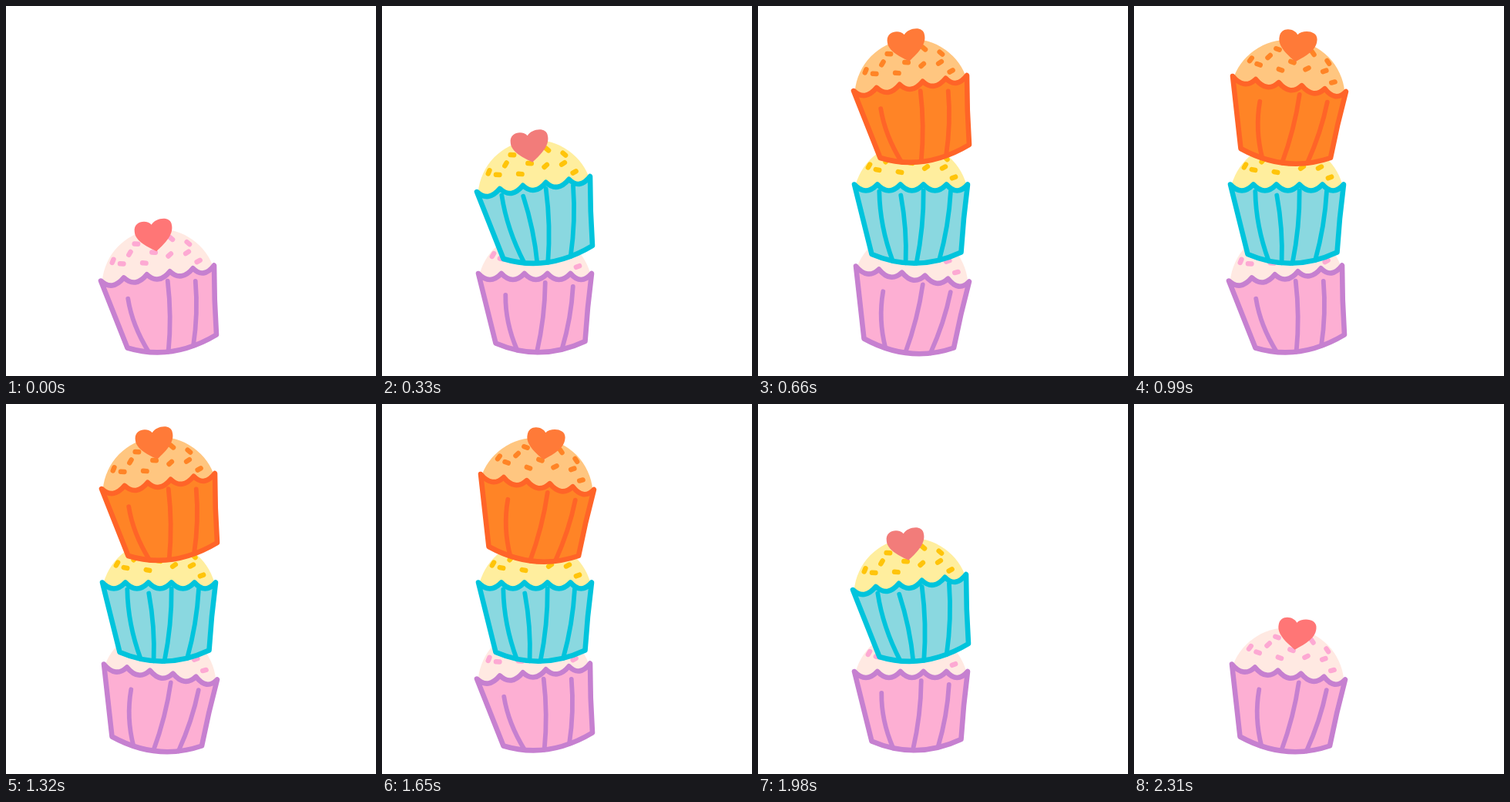
Animation, 480 px wide and 480 px high, one loop 2640 ms. Source, as an HTML page:

```html
<!DOCTYPE html>
<html lang="en">
<head>
<meta charset="utf-8">
<title>Cupcake stack</title>
<style>
html, body { margin: 0; width: 100%; height: 100%; overflow: hidden; background: #fff; }
svg { display: block; width: 100%; height: 100%; }
</style>
</head>
<body>
<svg id="stage" viewBox="0 0 480 480" fill="none" stroke-linecap="round" stroke-linejoin="round"></svg>
<script>
const STEP = 330;
const DOME_RADIUS = 74.5;
const PIVOT = [200, 367];
const TILT = 7.7;
const HEART = 'M0 0C-9 -6 -26 -16 -25 -29C-25 -43 -7 -43 -2 -35C4 -43 24 -44 24 -31C25 -17 9 -7 0 0Z';

// Each stripe: position along the rim, position along the base, gap below the rim.
const wideStripes = [[0.24, 0.24, 28], [0.59, 0.46, 12], [0.835, 0.74, 17]];
const closeStripes = [[0.22, 0.235, 9], [0.41, 0.38, 14], [0.61, 0.5, 8], [0.85, 0.755, 9]];

const risingBits = [[144, 323], [167, 316], [218, 325], [241, 325], [254, 338]];
const fallingBits = [[155, 328], [177, 305], [184, 331], [198, 319], [223, 304], [244, 313]];

// From the bottom of the stack to the top.
const cakes = [
  { shift: [0, 0], cup: '#fdafd3', line: '#c680d0', icing: '#ffe9e2', bits: '#fda9d3', heart: '#ff7676', stripes: wideStripes },
  { shift: [0, -115.5], cup: '#8ad8e0', line: '#00c4dc', icing: '#ffee9e', bits: '#ffc40a', heart: '#f27c7a', stripes: closeStripes },
  { shift: [1, -246.5], cup: '#ff8426', line: '#ff6428', icing: '#ffc680', bits: '#ff8426', heart: '#ff7a38', stripes: wideStripes }
];

// Lean of every cake in the stack: -1 left, 0 upright, 1 right.
const swayLeft = [1, 0, -1];
const swayRight = [-1, 0, 1];
const scenes = [[-1], [0, -1], swayLeft, swayRight, swayLeft, swayRight, [0, -1], [1]];

const mix = ([x0, y0], [x1, y1], t, drop = 0) => [x0 + (x1 - x0) * t, y0 + (y1 - y0) * t + drop];

function cornersFor(lean) {
  return {
    tl: [125 + 2 * lean, 347 - 9.5 * lean],
    tr: [272 + 2 * lean, 347 + 10.5 * lean],
    br: [263.5 - 9.5 * lean, 435 + 8.5 * lean],
    bl: [147.5 - 10 * lean, 437.5 - 6 * lean]
  };
}

function domePath({ tl, tr }) {
  const [left, right] = [mix(tl, tr, 0.012), mix(tl, tr, 0.988)];
  const [lowLeft, lowRight] = [mix(tl, tr, 0.06, 12), mix(tl, tr, 0.94, 12)];
  return `M${left}A${DOME_RADIUS} ${DOME_RADIUS} 0 0 1 ${right}L${lowRight} ${lowLeft}Z`;
}

function cupPath({ tl, tr, br, bl }) {
  const cusp = i => Math.min(1, i / 4.92);
  let path = `M${tl}`;
  for (let i = 1; i <= 5; i++) {
    path += `Q${mix(tl, tr, (cusp(i - 1) + cusp(i)) / 2, 16)} ${mix(tl, tr, cusp(i))}`;
  }
  const [x, y] = mix(tr, br, 0.5);
  return `${path}Q${x - 1.5} ${y} ${br}Q${mix(br, bl, 0.5, 26)} ${bl}Z`;
}

function stripePath({ tl, tr, br, bl }, [rim, base, gap]) {
  const start = mix(tl, tr, rim, gap);
  const end = mix(bl, br, base, 52 * base * (1 - base));
  const [x, y] = mix(start, end, 0.5);
  return `M${start}Q${x + (rim < 0.3 ? -8 : 5)} ${y} ${end}`;
}

function bitPath([x, y], angle) {
  const dx = 2.3 * Math.cos(angle * Math.PI / 180);
  const dy = 2.3 * Math.sin(angle * Math.PI / 180);
  return `M${x - dx} ${y - dy}l${2 * dx} ${2 * dy}`;
}

const sprinkles = [
  ...risingBits.map(p => bitPath(p, (p[0] - 315) * 0.35)),
  ...fallingBits.map(p => bitPath(p, p[0] < 200 ? 12 : 48))
].join('');

function cupcake(cake, lean, isTop) {
  const corners = cornersFor(lean);
  const turn = `rotate(${lean * TILT} ${PIVOT})`;
  const stripes = cake.stripes.map(stripe => stripePath(corners, stripe)).join('');
  return `<g transform="translate(${cake.shift})">
    <path d="${domePath(corners)}" fill="${cake.icing}"/>
    <path d="${sprinkles}" transform="${turn}" stroke="${cake.bits}" stroke-width="6.4"/>
    <path d="${cupPath(corners)}" fill="${cake.cup}" stroke="${cake.line}" stroke-width="6.6"/>
    <path d="${stripes}" stroke="${cake.line}" stroke-width="5.8"/>
    ${isTop ? `<path d="${HEART}" transform="${turn} translate(202 318)" fill="${cake.heart}"/>` : ''}
  </g>`;
}

const stage = document.getElementById('stage');
const drawings = scenes.map(leans =>
  leans.map((lean, i) => cupcake(cakes[i], lean, i === leans.length - 1)).join(''));
let shown = -1;

function render(time) {
  const index = Math.floor(time / STEP) % scenes.length;
  if (index !== shown) stage.innerHTML = drawings[shown = index];
}

const start = performance.now();
function tick() {
  render(performance.now() - start);
  requestAnimationFrame(tick);
}
tick();
</script>
</body>
</html>
```
